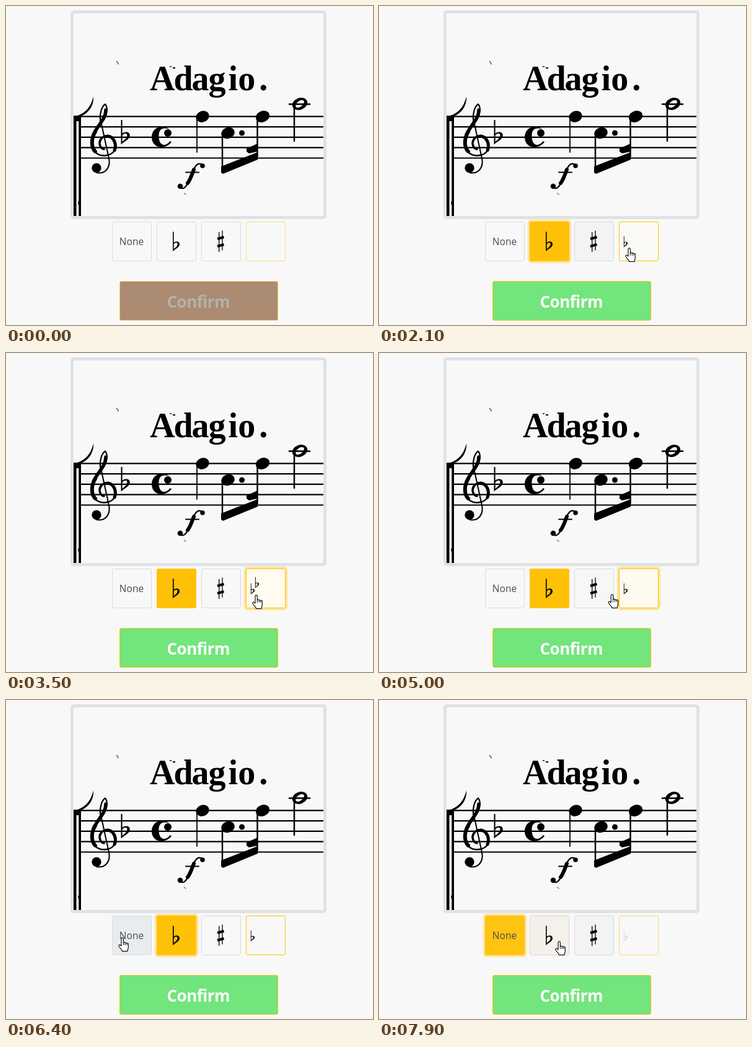
Recreate the animation shown at these times as an HTML page. Size 592 by 515 pixels, loop 8000 ms.

```html
<!DOCTYPE html>
<html lang="en">
<head>
<meta charset="utf-8">
<title>Key signature picker</title>
<style>
  html, body { margin: 0; width: 100%; height: 100%; overflow: hidden; background: #f8f8f8; }
  svg { display: block; width: 592px; height: 515px; }
  .ui { font-family: "Open Sans", "Noto Sans", sans-serif; text-anchor: middle; }
  .title { font: bold 56px "Liberation Serif", "Noto Serif", serif; }
  .line { fill: none; stroke: #000; stroke-linecap: round; stroke-linejoin: round; }
  .flat-end { stroke-linecap: butt; }
</style>
</head>
<body>
<svg viewBox="0 0 592 515">
  <defs>
    <path id="flat" fill-rule="evenodd" d="M0 0H1.600V17.500C5 14.500 11 15 11 20C11 25 5 27 0 31.500ZM1.600 20V28C5 25 7.600 23 7.600 19.800C7.600 16.600 4 16.800 1.600 20Z"/>
  </defs>
  <rect width="592" height="515" fill="#f8f8f8"/>

  <g id="score">
    <path d="M178 89.500l2 1 1 3.500" class="line" stroke-width="1"/>
    <text class="title" x="232" y="135.500" dx="0 -2 -2 -1 4 0 6">Adagio.</text>
    <path d="M264 97h3v1.500h-3zM269 99h4v2h-4z"/>
    <g id="staff" class="line flat-end" stroke-width="2.200"></g>
    <path d="M109 177H121V339H117.300V322L116 318L117.300 314V186H113.500V339H109Z"/>
    <path d="M141 146C142 160 134 176 112 181L111 178C129 174 137 162 141 146Z"/>

    <g class="line">
      <path stroke-width="2.200" d="M153 190C150 176 154 162 160 158.500C165 164 163 176 157 185"/>
      <path stroke-width="5.500" d="M161 168C161 183 147 193 141 208"/>
      <path stroke-width="6" d="M144 203C137 214 137 228 144 235"/>
      <path stroke-width="2.600" d="M143 235C152 245 170 243 176 232"/>
      <path stroke-width="5" d="M175 233C179 223 174 211 164 210"/>
      <path stroke-width="3.600" d="M166 210C154 208 149 219 152 226C153 229 156 231 158 231"/>
      <path stroke-width="2" d="M153 186L166 246C169 261 160 272 146 269"/>
    </g>
    <circle cx="146" cy="261.500" r="7.700"/>
    <use href="#flat" transform="translate(185.500 184) scale(1.300 1.250)"/>
    <path d="M264 199C252 190 235 196 235 212C235 229 256 234 267 219.500L265 218C257 228 247 226 246.500 211C246 199 252 195 264 199Z"/>
    <circle cx="261" cy="205" r="6"/>

    <g id="heads"></g>
    <circle cx="380.500" cy="205" r="4.500"/>
    <g class="line">
      <path stroke-width="1.800" d="M308 180V236"/>
      <path stroke-width="2.400" d="M349 205V267M405.500 180V243M465 160V218"/>
      <path stroke-width="2.600" d="M457 158.500H490"/>
    </g>
    <path d="M347 259L406 236V248L350 271L347 269ZM388 230L406 222V235L392 238L388 235Z"/>

    <g class="line">
      <path stroke-width="2.200" d="M317 257C309 250 304 260 300 270M294 284C290 294 285 297 280 292"/>
      <path stroke-width="6" d="M303 264C299 274 298 279 293 286"/>
      <path stroke-width="2" d="M290 268.500H311"/>
      <path stroke-width="1" d="M287.500 302l2.500 2.500"/>
    </g>
    <circle cx="317" cy="258" r="3.800"/>
    <circle cx="281" cy="291" r="4.300"/>
  </g>
  <rect x="106.500" y="9.500" width="408" height="332" rx="3" fill="none" stroke="#dee2e6" stroke-width="5"/>

  <g id="boxes"></g>
  <text id="none" class="ui" x="202.500" y="386" font-size="15.500">None</text>
  <use href="#flat" x="269" y="364.500"/>
  <g class="line flat-end">
    <path stroke-width="1.300" d="M343.700 365V397M349 362.500V394.500"/>
    <path stroke-width="4" d="M341 376L351.500 373M341 388L351.500 385"/>
  </g>
  <g id="signature"></g>

  <rect id="confirm" x="183.500" y="444.500" width="255" height="63" rx="2.500"/>
  <text id="label" class="ui" x="310.300" y="487" font-size="26" font-weight="700" letter-spacing="-.5">Confirm</text>

  <g id="cursor" stroke="#111" stroke-linejoin="round">
    <path id="arrow" fill="#fff" d="M0 0V16.500L3.800 13L6.500 19L9 18L6.400 12H11.500Z"/>
    <g id="hand" transform="translate(-5 0)">
      <path fill="#fff" stroke-width="1.200" d="M5 14V2.500a1.700 1.700 0 0 1 3.400 0V9a1.500 1.500 0 0 1 2.900.600a1.500 1.500 0 0 1 2.700.700a1.300 1.300 0 0 1 2.300 1.200V16.500c0 2.300-1.400 3.300-1.400 6.200H6.500c0-2.500-4-5-5.700-8.700c-.600-1.900 1.700-2.400 2.700-1.100z"/>
      <path fill="none" d="M8.400 9V13M11.300 9.700V13M14 10.500V13"/>
    </g>
  </g>
</svg>
<script>
const LOOP = 8000, STEP = 100, FADE = 150, SIZE = 64, TOP = 348;
const $ = id => document.getElementById(id);
const clamp = v => Math.min(1, Math.max(0, v));
const smooth = v => v * v * (3 - 2 * v);

function add(parent, tag, attrs) {
  const el = document.createElementNS('http://www.w3.org/2000/svg', tag);
  set(el, attrs);
  return parent.appendChild(el);
}
function set(el, attrs) {
  for (const k in attrs) el.setAttribute(k, attrs[k]);
}

for (let i = 0; i < 5; i++)
  add($('staff'), 'path', { d: `M${i ? 119 : 110} ${178.3 + 16.8 * i}H512` });

function head(x, y, rx, ry, tilt = -22, fill = '#000') {
  add($('heads'), 'ellipse', { cx: x, cy: y, rx, ry, fill, transform: `rotate(${tilt} ${x} ${y})` });
}
head(317, 178.5, 11, 9);
head(358, 205, 11, 9);
head(414, 178.5, 11.5, 9);
head(474, 158, 12.5, 9.5);
head(474, 158, 8, 4.5, -38, '#f8f8f8');

// Option boxes: none, flat, sharp, signature
const NONE = 0, FLAT = 1, SIGN = 3;
const boxes = [0, 1, 2, 3].map(i => {
  const left = 171 + 72 * i, sign = i === SIGN;
  const layer = (pad, fill, stroke = 'none') => add($('boxes'), 'rect', {
    x: left - pad, y: TOP - pad, width: SIZE + 2 * pad, height: SIZE + 2 * pad, rx: 3 + pad, fill, stroke });
  return {
    left,
    ring: layer(3.2, '#ffe49a'),
    base: layer(0, '#f8f8f8'),
    hover: layer(0, sign ? '#fffbf0' : '#e9ecef'),
    edge: layer(-.5, 'none', sign ? '#ffc107' : '#d9dbdd'),
    picked: layer(0, '#ffc107')
  };
});

// Each flat sits a fourth up or a fifth down from the last
const flats = Array.from({ length: 7 }, (_, i) => {
  const lift = i % 2 ? 3 - (i - 1) / 2 : -i / 2;
  return add($('signature'), 'use', {
    href: '#flat', transform: `translate(${394.8 + 7.1 * i} ${372 - 3.4 * lift}) scale(.56)` });
});

// Pointer moves: start, end, x, y
const origin = { x: 586, y: 23 };
const moves = [
  [100, 700, 262, 374],
  [1800, 2100, 402, 390],
  [4900, 5250, 262, 385],
  [5750, 6300, 186, 383],
  [7250, 7550, 449, 385],
  [7600, 7900, 289, 389]
];
// Focus changes: time, box
const clicks = [[1260, FLAT], [2380, SIGN], [5280, FLAT], [6480, NONE], [7890, FLAT]];
// Clicks on the signature box: start, interval
const bursts = [[2380, 153], [3480, 220]];

function pointer(t) {
  let { x, y } = origin;
  for (const [from, to, nx, ny] of moves) {
    const p = smooth(clamp((t - from) / (to - from)));
    x += (nx - x) * p;
    y += (ny - y) * p;
  }
  return { x, y };
}
const over = (i, t) => {
  const { x, y } = pointer(t), { left } = boxes[i];
  return x >= left && x < left + SIZE && y >= TOP && y < TOP + SIZE;
};
const lastClick = (t, list = clicks) => list.reduce((box, c) => c[0] <= t ? c[1] : box, -1);
const choice = t => lastClick(t, clicks.filter(c => c[1] !== SIGN));

function flatCount(t) {
  let n = 0;
  for (const [from, gap] of bursts)
    if (t >= from) n += Math.min(7, 1 + Math.floor((t - from) / gap));
  return 1 + n % 7;
}

// Eased share of the last span in which a state held
function fade(state, t, span = FADE) {
  const n = 15;
  let sum = 0;
  for (let i = 0; i < n; i++) sum += state(t - span * i / n) ? 1 : 0;
  return smooth(sum / n);
}

function draw(t) {
  boxes.forEach((b, i) => {
    set(b.hover, { opacity: fade(u => over(i, u), t) });
    set(b.picked, { opacity: fade(u => choice(u) === i, t) });
    set(b.ring, { opacity: fade(u => lastClick(u) === i, t) });
  });

  const isOpen = u => choice(u) === FLAT;
  const open = fade(isOpen, t, 40);
  const shade = Math.round(255 * (1 - open));
  set(boxes[SIGN].edge, { opacity: .5 + .5 * open });
  set($('signature'), { fill: `rgb(${shade},${shade},${shade})` });
  const count = isOpen(t) ? flatCount(t) : 0;
  flats.forEach((f, i) => set(f, { visibility: i < count ? 'visible' : 'hidden' }));

  const ready = choice(t) >= 0;
  set($('none'), { fill: choice(t) === NONE ? '#212529' : '#484c50' });
  set($('confirm'), { fill: ready ? '#72e57c' : '#ab8b72', stroke: ready ? '#ffc107' : '#f5cf60' });
  set($('label'), { fill: ready ? '#fff' : '#b3b1ae' });

  const { x, y } = pointer(t);
  const hand = boxes.some((_, i) => over(i, t));
  set($('cursor'), { transform: `translate(${x} ${y})`, display: t < 200 ? 'none' : 'inline' });
  set($('hand'), { display: hand ? 'inline' : 'none' });
  set($('arrow'), { display: hand ? 'none' : 'inline' });
}

const start = performance.now();
function tick() {
  const t = (performance.now() - start) % LOOP;
  draw(Math.floor(t / STEP) * STEP);
  requestAnimationFrame(tick);
}
tick();
</script>
</body>
</html>
```
